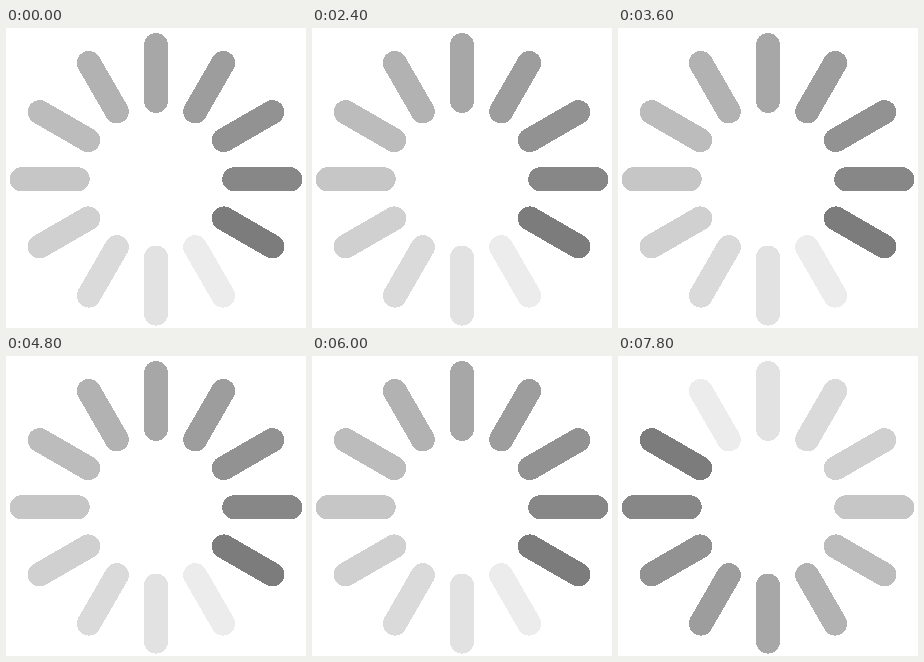
Write an HTML page that moves like this. It is 300 px wide and 300 px high and loops after 8 s.

```html
<!DOCTYPE html>
<html lang="en">
<head>
<meta charset="utf-8">
<title>Spinner</title>
<style>
  html, body { margin: 0; width: 100%; height: 100%; overflow: hidden; background: #fff; }
  svg { display: block; width: 100vw; height: 100vh; }
  line { stroke-width: 24; stroke-linecap: round; shape-rendering: crispEdges; }
</style>
</head>
<body>
<svg viewBox="0 0 300 300"><g id="spokes" transform="translate(150 151.3)"></g></svg>
<script>
  const COUNT = 12;
  const STEP_MS = 300;
  const SPOKES_PER_STEP = 3;
  const LOOP_MS = 8000;
  const HEAD = 4; // clock position of the darkest spoke at the start
  const GRAYS = [124, 135, 146, 157, 167, 178, 188, 198, 208, 218, 226, 236];

  const group = document.getElementById("spokes");
  const spokes = Array.from({ length: COUNT }, (_, i) => {
    const line = document.createElementNS("http://www.w3.org/2000/svg", "line");
    line.setAttribute("y1", -78.3);
    line.setAttribute("y2", -134.3);
    line.setAttribute("transform", `rotate(${i * 360 / COUNT})`);
    group.appendChild(line);
    return line;
  });

  function draw(ms) {
    const head = HEAD + Math.floor(ms / STEP_MS) * SPOKES_PER_STEP;
    spokes.forEach((line, i) => {
      const g = GRAYS[(((head - i) % COUNT) + COUNT) % COUNT];
      line.setAttribute("stroke", `rgb(${g},${g},${g + 1})`);
    });
  }

  const start = performance.now();
  function tick() {
    draw((performance.now() - start) % LOOP_MS);
    requestAnimationFrame(tick);
  }
  tick();
</script>
</body>
</html>
```
